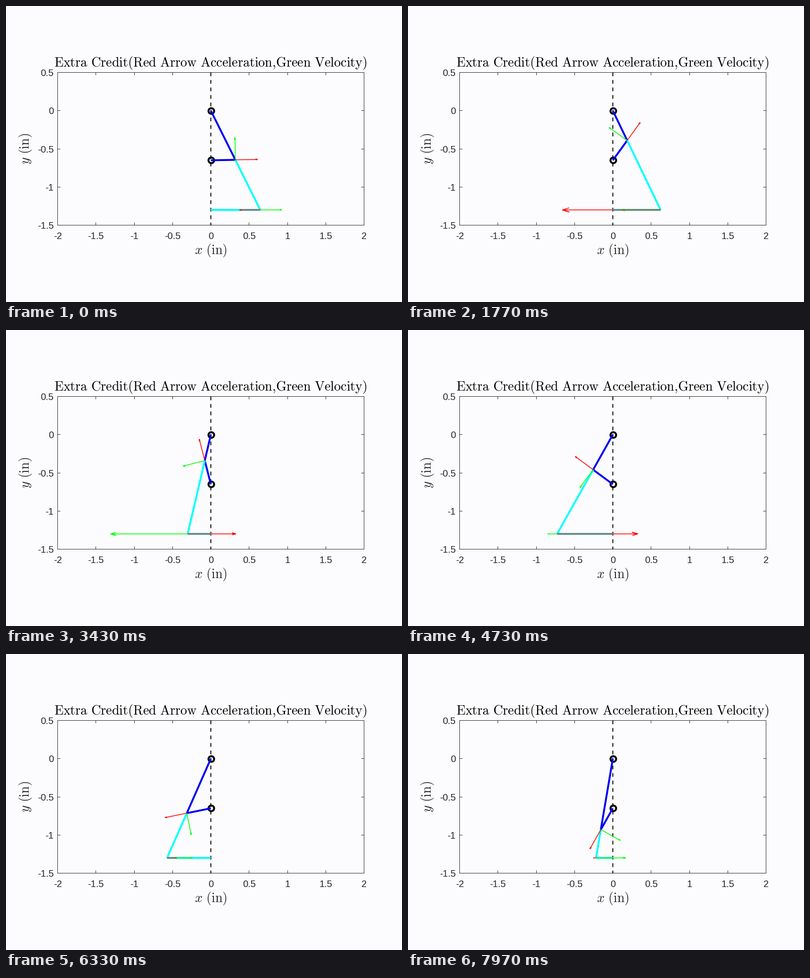
Animation of 840x630 px, one loop 8000 ms. Source, as a matplotlib script:

```python
import numpy as np
import matplotlib.pyplot as plt
from matplotlib.animation import FuncAnimation

W, H, DPI = 840, 630, 100
PX = 72 / DPI                      # points per pixel
UNIT, X0, Y0 = 162.5, 434.5, 222.75
LEFT, RIGHT, TOP, BOTTOM = 109.5, 759.5, 141.5, 466.5
INK = "#262626"
TICK, FRAMES = 20, 400             # 20 ms ticks, pose changes 30 times a second

R, D, L = 0.32, 0.65, 1.3          # crank, pivot distance, slider depth
GAIN = 0.9                         # arrow scale

plt.rcParams["mathtext.fontset"] = "cm"

fig = plt.figure(figsize=(W / DPI, H / DPI), dpi=DPI, facecolor="#fcfcfe")
ax = fig.add_axes([0, 0, 1, 1])
ax.set_xlim(0, W)
ax.set_ylim(H, 0)
ax.axis("off")


def to_px(p):
    return np.array([X0 + UNIT * p[0], Y0 - UNIT * p[1]])


def line(color, width, pts=((0, 0), (0, 0)), **kw):
    xs, ys = zip(*pts)
    return ax.plot(xs, ys, color=color, lw=width * PX, snap=False,
                   solid_capstyle="butt", **kw)[0]


def label(x, y, text, size, color=INK, **kw):
    ax.text(x, y, text, fontsize=size * PX, color=color, va="baseline", **kw)


def draw_axes():
    for i in range(9):
        x = X0 + (i - 4) * UNIT / 2
        mark = np.floor(x) + 0.5
        line(INK, 1, [(mark, BOTTOM), (mark, BOTTOM - 6)])
        line(INK, 1, [(mark, TOP), (mark, TOP + 6)])
        label(x, 496, f"{-2 + i / 2:g}", 20, ha="center",
              family="Liberation Sans")
    for i in range(5):
        y = Y0 + (i - 1) * UNIT / 2
        mark = np.floor(y) + 0.5
        line(INK, 1, [(LEFT, mark), (LEFT + 6, mark)])
        line(INK, 1, [(RIGHT, mark), (RIGHT - 6, mark)])
        label(101, mark + 7.5, f"{0.5 - i / 2:g}", 20, ha="right",
              family="Liberation Sans")
    line(INK, 1, [(LEFT, TOP), (RIGHT, TOP), (RIGHT, BOTTOM),
                  (LEFT, BOTTOM), (LEFT, TOP)], solid_joinstyle="miter")
    title = r"Extra\ Credit(Red\ Arrow\ Acceleration{,}Green\ Velocity)"
    label(X0, 129, rf"$\mathrm{{{title}}}$", 28.15, "black", ha="center")
    label(X0 - 0.5, 527.5, r"$x\ \mathrm{(in)}$", 28.15, ha="center")
    label(49, 304, r"$y\ \mathrm{(in)}$", 28.15, ha="center",
          rotation=90, rotation_mode="anchor")


draw_axes()
line("black", 2, [(X0, TOP), (X0, BOTTOM)], dashes=(4, 4),
     dash_capstyle="butt")
for depth in (0, D):
    ax.plot(*to_px((0, -depth)), "o", ms=12 * PX, mfc="none", mec="black",
            mew=4 * PX, snap=False)

rocker = line("#0000f4", 4)
crank = line("#0000f4", 4)
rod = line("#00ffff", 4)
slider = line("#00ffff", 4)
arrows = [line(c, 1.6, solid_joinstyle="round")
          for c in ("#00ff00", "#ff0000", "#00ff00", "#ff0000")]


def connect(art, *pts):
    art.set_data(*np.array([to_px(p) for p in pts]).T)


def point(art, start, vec):
    """Shaft plus a small V head proportional to the arrow length."""
    start, vec = np.array(start), GAIN * np.array(vec)
    tip = start + vec
    side = 0.021 * np.array([-vec[1], vec[0]])
    neck = tip - 0.068 * vec
    connect(art, start, tip, neck + side, tip, neck - side)


def update(i):
    step = (i * TICK + 15) * 3 // 100
    th = 2 * np.pi * (step + 1) / 359
    c, s = np.cos(th), np.sin(th)
    drop = D - R * s
    pin = (R * c, -drop)

    tan = R * c / drop
    x = L * tan
    vel = L * R * (R - D * s) / drop**2
    acc = L * R * c * (2 * R * (R - D * s) / drop**3 - D / drop**2)
    swing = vel / (L * (1 + tan**2))
    acc += 2 * L * tan * swing**2
    end = (x, -L)

    connect(rocker, (0, 0), pin)
    connect(crank, (0, -D), pin)
    connect(rod, pin, end)
    connect(slider, (0, -L), end)
    point(arrows[0], pin, (-R * s, R * c))
    point(arrows[1], pin, (R * c, R * s))
    point(arrows[2], end, (vel, 0))
    point(arrows[3], end, (acc, 0))
    return [rocker, crank, rod, slider, *arrows]


anim = FuncAnimation(fig, update, frames=FRAMES, interval=TICK,
                     init_func=lambda: update(0), repeat=True, repeat_delay=0,
                     blit=False)
plt.show()
```
